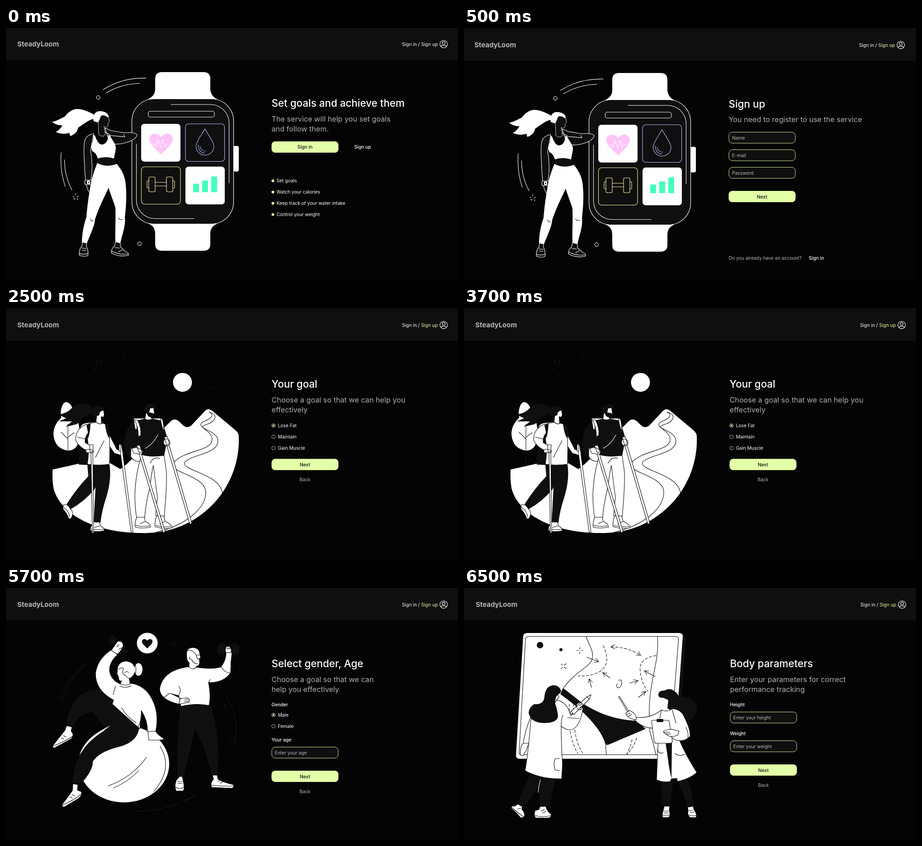
Recreate the animation shown at these times as an HTML page. Size 1000 px wide and 560 px high, loop 8 s.

```html
<!DOCTYPE html>
<html lang="en">
<head>
<meta charset="utf-8">
<title>Fitness onboarding</title>
<style>
html, body { margin: 0; width: 100%; height: 100%; overflow: hidden; background: #040404; }
svg { display: block; width: 100%; height: 100%; }

/* Screens cut hard from one to the next */
.scene { opacity: 0; animation: 8s step-end infinite; }
#welcome { animation-name: welcome; }
#register { animation-name: register; }
#goal { animation-name: goal; }
#profile { animation-name: profile; }
#body { animation-name: body; }
@keyframes welcome { 0% { opacity: 1 } 6.25%, 100% { opacity: 0 } }
@keyframes register { 0% { opacity: 0 } 6.25% { opacity: 1 } 31.25%, 100% { opacity: 0 } }
@keyframes goal { 0% { opacity: 0 } 31.25% { opacity: 1 } 56.25%, 100% { opacity: 0 } }
@keyframes profile { 0% { opacity: 0 } 56.25% { opacity: 1 } 81.25%, 100% { opacity: 0 } }
@keyframes body { 0% { opacity: 0 } 81.25%, 100% { opacity: 1 } }

text { font: 10.3px Inter, "Open Sans", sans-serif; fill: #fff; }
.brand { font-size: 15px; font-weight: 700; fill: #b6b6b6; }
.title { font-size: 22.4px; font-weight: 500; }
.lead { font-size: 16.2px; fill: #b0b0b0; }
.mid { text-anchor: middle; }
.bold { font-weight: 500; }
.next { font-weight: 500; fill: #0f0f0f; text-anchor: middle; }
.soft { fill: #b6b6b6; }
.up { fill: var(--up, #fff); }
.member { --up: #e3ffa8; }
.lime { fill: #e3ffa8; }
.field { fill: #0f0f0f; stroke: #d0ea9a; }
.ring { fill: none; stroke: #b6b6b6; }

.art { fill: #fff; stroke: #0c0c0c; stroke-width: 1.1; stroke-linecap: round; stroke-linejoin: round; }
.line { fill: none; }
.out { fill: none; stroke: #fff; }
.dark { fill: #0f0f0f; stroke: #fff; }
.ink { fill: #0f0f0f; stroke: none; }
.plain { stroke: none; }
.faint { fill: none; stroke: #171717; }
.dash { fill: none; stroke-dasharray: 6 4; }
.arrow { fill: none; marker-end: url(#tip); }
</style>
</head>
<body>
<svg viewBox="0 0 1000 560" preserveAspectRatio="none">
<defs>
  <marker id="tip" viewBox="-10 -6 12 12" markerWidth="12" markerHeight="12" markerUnits="userSpaceOnUse" orient="auto-start-reverse">
    <path d="M-9-5L0 0L-9 5" fill="none" stroke="#0c0c0c"/>
  </marker>
  <rect id="button" class="lime" x="587.5" width="148" height="25" rx="8"/>
  <rect id="field" class="field" x="588" y=".5" width="147" height="24.5" rx="8"/>
  <circle id="radio" class="ring" cx="591.8" r="4"/>
  <g id="chosen"><circle class="ring" cx="591.8" r="4" style="stroke:#dcdcd0"/><circle class="lime" cx="591.8" r="2"/></g>
  <path id="heart" d="M0-12C-6-21-17-23-23-16C-28-9-26-2-20 6L0 26L20 6C26-2 28-9 23-16C17-23 6-21 0-12Z"/>

  <g id="head">
    <rect x="-10" y="-1" width="1020" height="72" fill="#0f0f0f"/>
    <text class="brand" x="25" y="41">SteadyLoom</text>
    <text x="876" y="39.5">Sign in / <tspan class="up">Sign up</tspan></text>
    <g fill="none" stroke="#fff" stroke-width="1.2">
      <circle cx="968.3" cy="35.8" r="8.3"/><circle cx="968.3" cy="33.3" r="3.2"/>
      <path d="M962.5 41.6Q963 38.6 966 38.6H970.6Q973.6 38.6 974.1 41.6"/>
    </g>
  </g>

  <g id="watch" class="art">
    <g class="plain">
      <path d="M315 158C328 151 330 143 330 135V113Q330 98 345 98H437Q452 98 452 113V135C452 143 456 153 467 158Z"/>
      <path d="M315 435C328 439 330 450 330 458V480Q330 495 345 495H437Q452 495 452 480V458C452 447 456 440 467 435Z"/>
      <rect x="503" y="262" width="12" height="57" rx="4"/>
    </g>
    <rect class="dark" x="278.5" y="157.5" width="225" height="278" rx="49" stroke-width="1.2"/>
    <path class="out" d="M365 170H452A41 41 0 0 1 493.5 211V344M288.5 258V382A41 41 0 0 0 329 423.5H416"/>
    <rect class="out" x="314.5" y="185" width="146.5" height="13" rx="4.5"/>
    <g class="plain"><rect x="299" y="213" width="87" height="84" rx="7"/><rect x="397" y="308" width="87" height="84" rx="7"/></g>
    <g fill="none" stroke="#b6c3ff">
      <rect x="397" y="213" width="86.5" height="83.5" rx="7"/>
      <path d="M440 224C436 233 420.5 252 420.5 263A19.7 19.7 0 0 0 460 263C460 252 444 233 440 224ZM425.5 260C425 271 431 278 440 278M429 263Q431 273 442 274"/>
    </g>
    <g fill="none" stroke="#fff3a8">
      <rect x="299.5" y="308.5" width="86.5" height="83" rx="7"/>
      <rect x="316" y="331" width="14" height="33" rx="3"/><rect x="355" y="331" width="14" height="33" rx="3"/>
      <path d="M316 339.5H314Q312 340 312 342V353Q312 355.5 314 355.5H316M369 339.5H371Q373 340 373 342V353Q373 355.5 371 355.5H369M330 343H355M330 351H355"/>
    </g>
    <use href="#heart" x="343" y="255" style="fill:#ffc4f7;stroke:none"/>
    <path class="out" d="M317 258H328L331 263L336 248L342 266L347 247L352 264L355 258H369"/>
    <path d="M414 346h13v19h-13zM434 339h13v26h-13zM454 330h13v35h-13z" style="fill:#45ffbc;stroke:none"/>
    <g class="out">
      <circle cx="204" cy="154.3" r="4"/><circle cx="295.3" cy="479.3" r="4"/>
      <path d="M215 137Q257 110 310 111.5M222 144Q256 124 296 123M122 277Q119 318 131 352M129.5 293Q129 328 146 360"/>
      <path d="M154 368v3M148 374l3 1M160 374l-3 1.5M151 381l2-2M159 382l-2-3M149 379h1"/>
    </g>

    <path class="plain" d="M194 192C183 186 168 179 155 180C143 182 135 190 130 197C121 201 112 207 102 208.5C108 214 118 217 125 216C121 223 116 228 110 231C120 236 131 236 140 233L142 240C152 237 159 229 159 222C171 214 183 204 194 202Z"/>
    <path class="dark" d="M204 207L205 237Q214 244 220 237L217 219Q223 222 226 217L225.5 212L229 208L226 194Q208 188 204 207Z" stroke-width=".8"/>
    <path class="plain" d="M194 207C191 190 200 183 212 185C223 187 228 192 226 199C220 195 215 192 210 195Q206 208 203 210Z"/>
    <path class="dark" d="M219 222L232 228L262 233Q285 231 290 237Q289 245 276 251Q257 259 240 258Q227 250 222 232Z"/>
    <path class="out" d="M219 231L232 239L263 242L260 237"/>
    <path class="dark" d="M194 235C179 237 173 246 173 260C171 280 174 295 174 312L176 338L178 350Q181 365 194 376Q199 376 197 364L189 350L188 337C192 312 191 292 187 272Z"/>
    <rect class="dark" x="174.5" y="338" width="16" height="10" rx="2"/><rect class="plain" x="179" y="339" width="7" height="8" rx="2"/>
    <circle class="ink" cx="182.5" cy="343" r="1.5"/>
    <path class="ink" d="M203 284H239L246 306H200Z"/>
    <path class="plain" d="M194 237C199 240 198 245 201 249Q205 258 212 259Q222 258 225 247L226 238L230 239C235 250 243 257 243 267C242 276 240 282 239 290Q220 284 203 290C200 280 196 276 191 274C188 267 188 260 192 253Q193 246 194 237Z"/>
    <path class="plain" d="M202 300C197 313 190 330 187 350C182 380 180 395 178 420C171 440 168 460 168 476L179 478C188 455 196 440 197 425C207 395 218 375 227 355C234 378 240 390 242 400C243 430 241 450 242 475L253 478C258 455 265 440 263 420C266 395 267 370 265 350C264 330 256 315 245 302Q222 311 202 300Z"/>
    <path class="line" d="M187 424Q188 431 193 428M249 422Q251 428 258 425"/>
    <path class="dark" d="M169 476L168 485Q162 489 162 505Q172 509 181 506Q183 495 178 486L178 478ZM242 475L240 485Q233 489 233 500Q251 510 271 505Q272 498 264 497L253 486L253 478Z"/>
    <path class="out" d="M162 501Q172 504 181 501M168 489L177 490M169 494L177 494M234 496Q252 505 270 502M241 488L251 489M249 497L257 493"/>
  </g>
</defs>

<g class="scene" id="welcome">
  <use href="#head"/><use href="#watch"/>
  <text class="title" x="587.5" y="175">Set goals and achieve them</text>
  <text class="lead" x="587.5" y="208">The service will help you set goals</text>
  <text class="lead" x="587.5" y="230">and follow them.</text>
  <use href="#button" y="252"/><text class="next" x="661.5" y="268">Sign in</text>
  <text class="mid bold" x="789" y="268">Sign up</text>
  <g class="lime"><circle cx="590.5" cy="339.5" r="3"/><circle cx="590.5" cy="364.5" r="3"/><circle cx="590.5" cy="389.5" r="3"/><circle cx="590.5" cy="414.5" r="3"/></g>
  <text x="598.5" y="343">Set goals</text><text x="598.5" y="368">Watch your calories</text>
  <text x="598.5" y="393">Keep track of your water intake</text><text x="598.5" y="418">Control your weight</text>
</g>

<g class="scene member" id="register"><g transform="translate(-2 2)">
  <use href="#head"/><use href="#watch"/>
  <text class="title" x="587.5" y="175">Sign up</text>
  <text class="lead" x="587.5" y="207">You need to register to use the service</text>
  <use href="#field" y="229"/><text class="soft" x="595" y="246">Name</text>
  <use href="#field" y="268"/><text class="soft" x="595" y="285">E-mail</text>
  <use href="#field" y="307"/><text class="soft" x="595" y="324">Password</text>
  <use href="#button" y="360"/><text class="next" x="661.5" y="376.5">Next</text>
  <text class="soft" x="587.5" y="513">Do you already have an account?</text>
  <text class="bold" x="765" y="513">Sign in</text>
</g></g>

<g class="scene member" id="goal">
  <g transform="translate(0 2)">
    <use href="#head"/>
    <text class="title" x="587.5" y="175">Your goal</text>
    <text class="lead" x="587.5" y="208">Choose a goal so that we can help you</text>
    <text class="lead" x="587.5" y="230">effectively</text>
    <use href="#chosen" y="259.3"/><text x="601.5" y="263">Lose Fat</text>
    <use href="#radio" y="284.3"/><text x="601.5" y="288">Maintain</text>
    <use href="#radio" y="309.3"/><text x="601.5" y="313">Gain Muscle</text>
    <use href="#button" y="333.3"/><text class="next" x="661.5" y="349.5">Next</text>
    <text class="soft mid" x="661.5" y="383">Back</text>
  </g>
  <g class="art">
    <g class="faint"><circle cx="206" cy="121" r="6"/><path d="M257 102l3 3M265 101l-2 3M258 109l2-1M452 175l3 3M461 176l-3 3M191 134l3 2M198 134l-3 6"/></g>
    <circle class="plain" cx="390.4" cy="165.2" r="21"/>
    <path class="plain" d="M103 359L165 345H231L253 358L268 346L351 265L364 252Q373 243 384 253L393 262Q401 268 410 261L440 229Q447 221 457 229L507 271Q515 278 515 285A207 207 0 0 1 300 500C205 500 121 463 105 400Q102 380 103 359Z"/>
    <path class="line" d="M449 231C463 238 453 246 438 252C415 264 456 270 456 292C456 318 398 315 372 342C350 366 443 369 442 411C441 445 399 483 330 499M449 231C472 237 463 253 443 259C415 268 470 271 469 296C468 325 410 325 395 343C388 362 474 368 479 412"/>
    <path class="plain" d="M121 231Q124 209 134 209Q143 211 148 225L159 251Q164 270 163 285Q160 316 138 317Q107 313 105 280Q105 260 122 244Z"/>
    <path class="ink" d="M116 237Q136 234 147 221Q159 210 177 213Q190 217 194 226L190 235L171 243L157 258L132 264L146 252L117 252L133 245Z"/>
    <path class="line" d="M137 258V352M137 291L122 276M137 287L151 277" stroke="#171717"/>

    <path class="ink" d="M164 312Q160 330 161 348L184 349L180 318Z"/>
    <path d="M163 270Q165 256 180 255L200 253V260L170 290Z"/>
    <path class="ink" d="M180 348H208Q205 380 196 403Q172 431 143 447L134 436Q157 400 182 374ZM183 348H229Q234 380 222 420Q212 450 209 477L194 475L198 400Z"/>
    <path d="M127 437Q135 434 143 447Q150 454 146 463Q144 470 139 468Q134 455 126 447ZM193 476Q187 485 186 494Q200 499 217 495Q219 490 209 484L207 476Z"/>
    <path class="line" d="M128 444Q138 449 141 464M187 491Q200 494 215 492M196 488L207 484"/>
    <path class="plain" d="M200 232Q200 225 215 225L217 237L215 242L210 241L211 258H200Z"/>
    <path class="ink" d="M191 236Q188 220 203 217Q216 217 218 228Q209 227 207 234Q207 240 203 239Q200 240 201 247Q193 244 191 236Z"/>
    <path d="M183 257L200 254Q207 260 213 256Q231 259 230 278L229 347Q204 351 180 347Q185 315 180 290Z"/>
    <path class="ink" d="M179 259L187 256Q186 281 181 290Q175 278 179 259ZM219 257Q234 265 231 293Q222 284 219 257Z"/>
    <path d="M178 258Q154 268 154 293Q160 309 183 319L190 308L175 299Q174 287 182 277ZM229 282L245 314L257 318Q264 324 255 328Q247 324 240 323L229 307Z"/>
    <path class="line" d="M217 295Q210 308 198 332M158 287L175 291"/>
    <path d="M188 319L192 318L194 500H191ZM251 305L256 305L281 498L277 499Z"/>
    <path d="M185 304H193L192 320H186ZM177 315Q185 312 194 318L192 322L177 321ZM250 303H254V318H250Z"/>

    <path class="ink" d="M288 247Q263 263 261 305Q265 330 277 331L300 300Z"/>
    <path d="M282 245H346L347 267L286 270Z"/>
    <path d="M276 312L297 306L302 330L296 341Q281 341 276 330Z"/>
    <path class="plain" d="M310 233L319 221H326L328 236L320 239L321 249H308Z"/>
    <path class="ink" d="M307 233Q303 217 316 214Q331 212 333 222L319 223L317 232L327 234L328 239Q323 245 315 241L311 234Z"/>
    <path d="M300 326Q286 370 285 420Q286 450 289 466L307 466Q308 440 318 400Q323 360 326 350Q330 385 335 420L331 461L350 463Q356 400 355 365L350 328Z"/>
    <path d="M289 465Q284 480 286 487Q300 491 320 487Q320 480 308 474L306 465ZM333 462Q328 478 330 486Q350 492 367 489Q369 482 352 474L349 462Z"/>
    <path class="line" d="M287 483Q302 487 318 484M331 483Q350 488 366 486M297 479L307 475M340 480L351 475M319 345Q325 330 340 334"/>
    <path class="ink" d="M289 250L307 246Q315 250 324 246L343 250Q353 270 357 292L350 328Q320 333 299 326L289 309Z"/>
    <path d="M284 248L291 249Q300 267 298 283L293 286Q293 264 284 248ZM342 246L346 247Q350 262 349 274Q343 259 342 246Z"/>
    <path class="out" d="M336 282Q326 302 308 312"/>
    <path d="M291 313L296 312L352 497L348 500ZM355 303L360 302L411 478L407 481Z"/>
    <path d="M278 313Q290 306 303 318L300 325L283 323ZM289 306L296 305L301 319L295 322ZM350 287L357 286L362 304L356 307ZM350 292Q362 288 363 301L353 306Q346 301 350 292Z"/>
  </g>
</g>

<g class="scene member" id="profile">
  <g transform="translate(0 1)">
    <use href="#head"/>
    <text class="title" x="587.5" y="175">Select gender, Age</text>
    <text class="lead" x="587.5" y="208">Choose a goal so that we can</text>
    <text class="lead" x="587.5" y="230">help you effectively</text>
    <text class="bold" x="587.5" y="262">Gender</text>
    <use href="#chosen" y="281"/><text x="601.5" y="285">Male</text>
    <use href="#radio" y="306"/><text x="601.5" y="310">Female</text>
    <text class="bold" x="587.5" y="340">Your age</text>
    <use href="#field" y="352"/><text class="soft" x="594.5" y="368.5">Enter your age</text>
    <use href="#button" y="405"/><text class="next" x="661.5" y="421.5">Next</text>
    <text class="soft mid" x="661.5" y="455">Back</text>
  </g>
  <g class="art">
    <g class="faint"><path d="M119 248Q132 205 172 171M125 252Q139 205 177 170M484 235Q519 285 505 350M281 496Q355 498 421 460M394 472L420 461M481 268L486 258L490 268Z"/><circle cx="372" cy="124" r="4"/><circle cx="500" cy="336" r="4"/><path d="M380 102h3M386 102h3M380 108h3M386 108h3M379 142h4M379 146h4"/></g>
    <circle class="plain" cx="312.5" cy="122.5" r="23"/>
    <use href="#heart" class="ink" transform="translate(312.5 122.5) scale(.45)"/>
    <g class="ink"><path d="M-24-9h5v-4h10v9h18v-9h10v4h5v18h-5v4h-10v-9h-18v9h-10v-4h-5z" transform="translate(492 136)"/><path d="M225 116L236 104L246 113L241 119L257 136L263 133L271 141L254 153L247 143L250 138L237 123L231 126Z"/></g>
    <path class="ink" d="M241 250Q200 205 159 244Q134 272 133 306L148 309Q164 274 193 277L216 308L260 300Z"/>
    <ellipse class="plain" cx="261" cy="391" rx="100" ry="85.5"/>
    <path class="line" d="M226 440Q280 420 311 376M238 444Q270 431 294 405M341 352Q371 401 327 452"/>
    <path class="ink" d="M235 257L295 309Q292 342 250 353Q205 364 192 386Q193 405 166 435L147 435Q148 402 163 373Q176 343 217 317L215 290Z"/>
    <path class="plain" d="M162 372Q175 332 232 305L216 317Q178 339 162 372Z"/>
    <path d="M134 306L146 309L144 318L148 324Q149 333 141 337L108 355Q102 356 104 350Q117 333 130 317ZM148 435L159 437L158 449L167 453Q169 462 160 468L130 486Q123 488 125 480Q137 465 147 450Z"/>
    <path class="line" d="M105 351Q130 341 148 329M126 482Q149 472 167 458M122 333L128 336M127 328L133 331M141 464L147 467M146 459L152 462"/>
    <path d="M232 140L239 130Q243 120 249 118Q260 118 259 130L252 142L247 147Z"/>
    <path class="line" d="M240 128L245 122M245 131L250 126M250 136L258 132"/>
    <path class="plain" d="M247 187Q245 165 265 163Q284 164 285 183Q284 196 272 201L275 219H250L257 206Q249 207 250 199L246 190Z"/>
    <ellipse class="plain" cx="293" cy="181" rx="9" ry="14"/>
    <path class="line" d="M249 181Q258 174 260 180Q255 190 264 194Q269 200 272 201M263 188Q268 183 271 188M286 168Q289 183 286 194"/>
    <path d="M238 249Q198 228 198 190Q202 158 232 138L247 148Q228 165 229 185Q233 204 250 212Q265 220 276 212Q302 215 318 238Q341 274 331 319H313Q314 296 300 273L296 313L235 258Z"/>
    <path class="line" d="M237 237L242 218M252 218Q265 224 277 217M256 266Q266 285 288 300M299 273Q302 291 290 313L232 306"/>
    <path d="M314 319L331 318Q336 327 350 335Q348 338 335 338H316Z"/>

    <path class="ink" d="M386 258Q415 263 451 257Q475 320 468 415L455 418Q440 350 418 312Q408 360 393 419L379 418Q378 330 386 258Z"/>
    <path d="M384 419H390L392 429Q396 447 392 451H376Q372 440 377 427ZM457 416H467L469 425Q481 432 503 437Q505 444 499 445L455 443Q451 433 459 425Z"/>
    <path class="line" d="M375 443Q385 448 393 443M380 430H390M380 434H390M455 438Q477 441 502 440M469 430L476 426M474 434L481 430"/>
    <path class="plain" d="M400 150Q399 132 415 133Q427 134 428 145L430 155L427 159Q430 173 421 173L420 180H405L406 166Q400 162 400 150Z"/>
    <path class="line" d="M403 139Q414 137 421 149L428 149M421 150L424 158L430 156M407 153Q403 158 411 159Q413 167 424 169"/>
    <path d="M405 175Q412 184 421 176Q459 182 476 175Q487 160 487 143L500 143Q497 165 497 188Q482 211 448 210Q454 242 449 261Q420 255 387 263L382 239L366 235L390 247L382 258Q340 248 340 224Q347 182 405 175Z"/>
    <path class="line" d="M382 239Q389 226 382 218M476 175Q483 188 496 189M348 244L362 234L370 236M448 210L452 203"/>
    <path d="M386 246L400 244Q410 248 404 254L394 256L382 258ZM486 143Q483 130 492 129Q500 131 498 144Z"/>
    <path class="line" d="M395 249L403 247M395 253L405 251M487 135L497 135M491 130V135M495 131V135"/>
  </g>
</g>

<g class="scene member" id="body">
  <g transform="translate(1 1)">
    <use href="#head"/>
    <text class="title" x="587.5" y="175">Body parameters</text>
    <text class="lead" x="587.5" y="208">Enter your parameters for correct</text>
    <text class="lead" x="587.5" y="230">performance tracking</text>
    <text class="bold" x="587.5" y="262">Height</text>
    <use href="#field" y="274"/><text class="soft" x="594.5" y="290.5">Enter your height</text>
    <text class="bold" x="587.5" y="326">Weight</text>
    <use href="#field" y="338"/><text class="soft" x="594.5" y="354.5">Enter your weight</text>
    <use href="#button" y="391"/><text class="next" x="661.5" y="407.5">Next</text>
    <text class="soft mid" x="661.5" y="441">Back</text>
  </g>
  <g class="art">
    <path class="ink" d="M480 102H488Q492 104 491 111L472 374Q470 379 460 379Z"/>
    <path class="plain" d="M140 100H476Q484 100 484 107L465 372Q464 379.5 456 379.5H122Q115 379.5 115 371L131 107Q132 100 140 100Z"/>
    <path class="line" d="M143 107.5H468Q475 108 474.5 115L455 366Q455 370.5 450 370.5H126Q122 371 122 365L136 114Q137 107.5 143 107.5Z"/>
    <circle class="ink" cx="168.2" cy="127" r="7.2"/><circle class="ink" cx="214.5" cy="137" r="3.5"/>
    <path class="line" d="M256 132v4M256 142v4M249 139h4M259 139h4M215 169l3 2M226 168l-4 4M215 180l3-4M226 179l-4-3"/>
    <path class="line" d="M270 108C275 125 289 140 283 160C276 177 244 187 219 224M428 108C433 170 407 205 410 292M410 313L425 371M313 348L315 371M342 205Q349 202 349 210Q348 222 341 222Q335 219 339 213"/>
    <path class="dash" d="M308 128Q326 166 303 184Q281 198 252 195M425 150Q386 156 390 185Q392 210 407 230M233 258V280M242 257V278M235 318Q240 349 252 368M245 315Q249 346 262 366M382 333Q375 355 360 370M372 337Q368 354 360 368"/>
    <path class="dash" d="M325 131Q360 130 391 150" marker-start="url(#tip)" marker-end="url(#tip)"/>
    <g class="arrow"><path d="M272 154L298 164"/><path d="M323 200L307 188"/><path d="M282 221L277 202"/><path d="M367 211L385 206"/><path d="M423 197L399 184"/><path d="M386 243L402 230"/></g>
    <path class="ink" d="M219 222L262 256C302 282 340 293 381 295L402 313L320 348Q312 351 311 341C298 305 258 268 213 236Z"/>

    <path class="ink" d="M160 420H204Q192 462 191 486L166 488L168 425ZM148 412L171 423Q154 462 132 488L118 481Q131 443 148 412Z"/>
    <path class="out" d="M169 426Q165 440 164 454"/>
    <path d="M119 480L129 486L128 492Q134 497 134 506Q132 512 125 510Q114 497 105 490Q104 483 112 485ZM168 486L181 485Q184 497 192 502Q195 508 188 511H159Q154 508 157 495L166 492Z"/>
    <path class="line" d="M106 488Q117 498 131 508M157 506Q176 510 192 506M119 491L126 489M171 496L178 492M174 500L181 496"/>
    <path d="M147 288Q135 318 131 345Q124 352 125 371L131 373L138 360L145 340L156 300Z"/>
    <path class="plain" d="M202 232L214 229L212 248L207 256L200 255Z"/>
    <path d="M207 249Q223 254 230 267L237 284Q244 271 252 258L263 266Q261 290 250 306Q236 324 215 307Q215 350 218 390L216 424Q170 425 135 406C142 370 144 335 148 293Z"/>
    <path class="line" d="M215 307Q215 290 219 282M211 379H202Q197 388 201 404L211 406M229 288L254 290M131 345H143"/>
    <path class="ink" d="M199 216Q180 217 178 241Q177 260 155 258Q143 266 143 278Q148 300 178 300Q208 300 208 283Q205 265 202 258Q201 239 210 236L215 230Q212 217 199 216Z"/>
    <path class="line" d="M203 239Q210 236 210 243L204 249"/>
    <path d="M237 274L272 242L281 237L277 247L243 281ZM249 259Q256 251 262 257Q264 268 256 271Q248 269 249 259Z"/>
    <path class="line" d="M272 242L277 247M255 262L261 257M256 266L262 262M237 274L234 279L243 281"/>

    <path class="ink" d="M469 246Q482 239 500 245Q517 255 515 270Q513 290 493 297Q471 282 469 246ZM436 356L456 354L463 430L455 486L438 485ZM470 424L491 419Q507 452 508 486L494 488Q488 460 470 424Z"/>
    <path d="M443 485H455L454 494Q458 507 452 510H440Q437 506 441 494ZM495 487L507 485L509 493Q517 505 513 510H500Q493 503 496 496Z"/>
    <path class="line" d="M439 505H455M497 504Q506 508 514 505M443 496H452M443 500H452M498 495L506 494M500 499L509 498"/>
    <path class="plain" d="M435 244L455 237L460 270L438 273L442 265L436 264L437 257L433 254Z"/>
    <path class="ink" d="M430 238Q430 227 443 228Q456 221 465 229Q477 236 476 251Q476 265 489 274Q502 289 500 315Q495 335 475 337L461 275L450 267L452 249L441 244Q431 245 430 238Z"/>
    <path d="M437 271Q452 277 460 268Q481 270 487 286Q502 316 500 330Q488 341 477 339Q490 370 515 410Q500 424 472 430L471 423L459 424L456 430Q440 433 426 426L430 330L428 311Q398 315 376 292L381 287Q412 291 437 271Z"/>
    <path class="ink" d="M446 344H460L459 424L454 400Z"/>
    <path class="line" d="M437 271L433 290M460 269L469 300M477 339Q463 338 460 332M427 359Q432 370 441 366M467 368Q478 376 488 369M495 336Q498 322 491 310"/>
    <path d="M342 242L344 241L364 273L362 275ZM381 293L368 290Q358 284 358 278L366 272Q379 278 381 287Z"/>
    <path class="line" d="M360 281L368 278M363 285L371 281"/>
    <path d="M417 294H451Q454 294 454 297L461 340Q461 345 456 345H425Q422 345 421 342L415 297Q415 294 417 294Z"/>
    <rect class="ink" x="426" y="291" width="15" height="7" rx="2"/>
    <path d="M476 318L460 314Q441 315 441 320L450 327Q457 333 473 327Z"/>
    <path class="line" d="M443 320L456 321M447 324L457 325"/>
  </g>
</g>
</svg>
</body>
</html>
```
